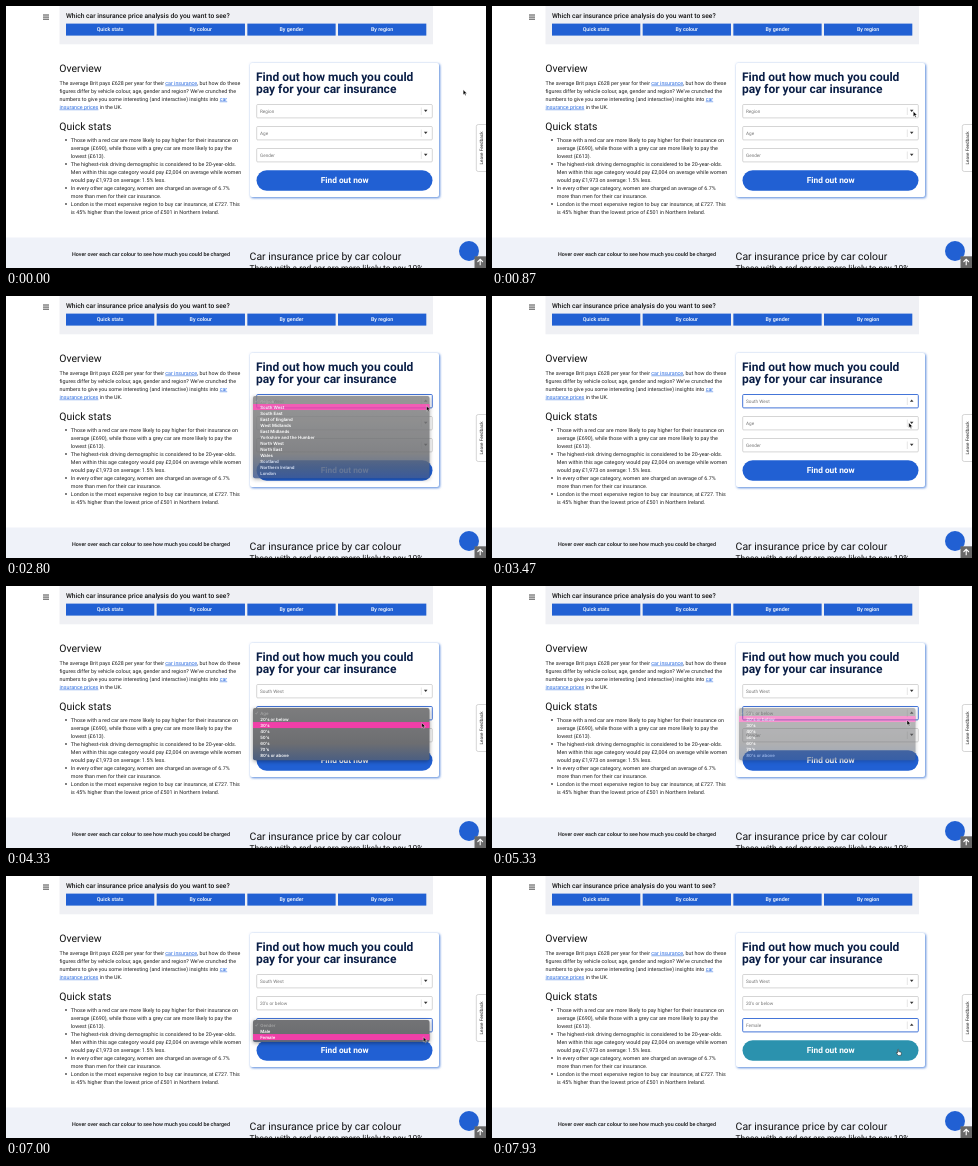
Recreate the animation shown at these times as an HTML page. Size 480 px wide and 262 px high, loop 8 s.

```html
<!DOCTYPE html>
<html lang="en">
<head>
<meta charset="utf-8">
<title>Car insurance price analysis</title>
<style>
  html, body { margin: 0; width: 100%; height: 100%; overflow: hidden; background: #fff; }
  svg { display: block; width: 480px; height: 262px; }
  text { font: 5.333px Roboto, sans-serif; fill: #222; white-space: pre; text-rendering: geometricPrecision; }
  .h2 { font-size: 10.45px; fill: #111; }
  .mid { text-anchor: middle; }
  .med { font-weight: 500; }
  .link { fill: #2a6be0; text-decoration: underline; }
  .nav { fill: #fff; font-weight: 500; text-anchor: middle; }
  .blue { fill: #2160d3; }
  .title { font-size: 12px; font-weight: 700; fill: #0b1f47; }
  .value { font-size: 4.667px; fill: #777; }
  .cta { font-size: 8.33px; font-weight: 700; fill: #fff; text-anchor: middle; }
  .card { filter: drop-shadow(1px 1px 1px #3f78d6c0) drop-shadow(0 0 1.2px #3f78d640); }
  .menu { filter: drop-shadow(0 1px 2px #0006); }
  .menu text { font: 600 4.333px Inter, sans-serif; fill: #fff; }
  .menu .off { fill: #a9a9a9; font-weight: 500; }
</style>
</head>
<body>
<svg viewBox="0 0 480 262" xmlns="http://www.w3.org/2000/svg">
  <defs>
    <linearGradient id="glass" gradientUnits="userSpaceOnUse" x1="0" y1="100" x2="0" y2="182">
      <stop offset="0" stop-color="#858585"/>
      <stop offset=".7" stop-color="#6d6e71"/>
      <stop offset=".88" stop-color="#4f607f"/>
      <stop offset="1" stop-color="#3f5a92"/>
    </linearGradient>
  </defs>

  <rect x="53.5" width="373.5" height="38.3" fill="#eff0f4"/>
  <path d="M37 9h6M37 11.1h6M37 13.2h6" stroke="#333" stroke-width=".9"/>
  <text x="60" y="12" class="med" style="font-size:6.667px;fill:#111">Which car insurance price analysis do you want to see?</text>
  <g id="nav"></g>

  <text x="53.3" y="66.4" class="h2">Overview</text>
  <text x="53.3" y="123.6" class="h2">Quick stats</text>
  <g id="copy"></g>

  <rect y="231.5" width="480" height="31" fill="#eff2f9"/>
  <text x="145" y="250" class="mid med" style="fill:#111">Hover over each car colour to see how much you could be charged</text>
  <text x="243.6" y="253.8" class="h2">Car insurance price by car colour</text>
  <text x="243.6" y="264.8" style="font-size:8.38px;fill:#111">Those with a red car are more likely to pay 10%</text>

  <rect class="card" x="244" y="57" width="189" height="134" rx="2" fill="#fff"/>
  <text x="250" y="75.3" class="title">Find out how much you</text>
  <text x="250" y="87.2" class="title">pay for your car insurance</text>
  <g id="fields"></g>
  <rect id="button" x="250.5" y="164.3" width="176" height="20.4" rx="10.2"/>
  <text x="338.7" y="177.2" class="cta">Find out now</text>

  <rect x="470.3" y="118.5" width="14" height="47" rx="2" fill="#fff" stroke="#bbb" stroke-width=".6"/>
  <text class="mid" transform="translate(477 142) rotate(-90)" style="font-size:4.6px">Leave Feedback</text>
  <circle cx="463" cy="245" r="10" class="blue"/>
  <rect x="468.5" y="250.3" width="11.5" height="11.7" fill="#686868"/>
  <path d="M474.2 259.3v-6M471.5 256l2.7-2.8 2.7 2.8" fill="none" stroke="#fff" stroke-width="1.1"/>

  <g id="menus"></g>
  <g id="cursor">
    <path id="arrow" d="M0 0v5l1.2-1.1.8 1.9.9-.4-.8-1.8h1.6z" fill="#000" stroke="#fff" stroke-width=".4"/>
    <path id="hand" d="M0 .4q.6-.8 1 0v2l2.4.6q.6.3.4 1.2l-.5 2H.6L-1.3 3.8q0-.8.7-.5l.6.5z" fill="#fff" stroke="#000" stroke-width=".45"/>
  </g>
</svg>
<script>
const NS = 'http://www.w3.org/2000/svg';
const $ = id => document.getElementById(id);
function add(parent, tag, attrs = {}, text = '') {
  const el = document.createElementNS(NS, tag);
  for (const k in attrs) el.setAttribute(k, attrs[k]);
  el.textContent = text;
  return parent.appendChild(el);
}

// Second half of the card heading's first line
document.querySelector('.title').textContent += ' could';

['Quick stats', 'By colour', 'By gender', 'By region'].forEach((label, i) => {
  const x = 60 + i * 90.67;
  add($('nav'), 'rect', { x, y: 17.6, width: 88.3, height: 12, class: 'blue' });
  add($('nav'), 'text', { x: x + 44.1, y: 25.3, class: 'nav' }, label);
});

// Underscores mark links, a leading star marks a bullet
function lines(x, y, list) {
  list.forEach((line, i) => {
    const base = y + i * 8;
    if (line[0] === '*') add($('copy'), 'circle', { cx: 60, cy: base - 1.8, r: .9, fill: '#444' });
    const text = add($('copy'), 'text', { x, y: base });
    line.replace('*', '').split('_').forEach((part, j) =>
      add(text, 'tspan', j % 2 ? { class: 'link' } : {}, part));
  });
}
lines(53.5, 78.6, [
  'The average Brit pays £628 per year for their _car insurance_, but how do these',
  'figures differ by vehicle colour, age, gender and region? We’ve crunched the',
  'numbers to give you some interesting (and interactive) insights into _car_',
  '_insurance prices_ in the UK.'
]);
lines(64.8, 135.8, [
  '*Those with a red car are more likely to pay higher for their insurance on',
  'average (£690), while those with a grey car are more likely to pay the',
  'lowest (£613).',
  '*The highest-risk driving demographic is considered to be 20-year-olds.',
  'Men within this age category would pay £2,004 on average while women',
  'would pay £1,973 on average: 1.5% less.',
  '*In every other age category, women are charged an average of 6.7%',
  'more than men for their car insurance.',
  '*London is the most expensive region to buy car insurance, at £727. This',
  'is 45% higher than the lowest price of £501 in Northern Ireland.'
]);

const ROW = 6.02;
const fields = [
  { y: 98.5, open: 1133, close: 2667, blur: 3667, pick: 1,
    items: ['Region', 'South West', 'South East', 'East of England', 'West Midlands', 'East Midlands',
      'Yorkshire and the Humber', 'North West', 'North East', 'Wales', 'Scotland', 'Northern Ireland', 'London'] },
  { y: 120.5, open: 3667, close: 5133, blur: 6067, pick: 1,
    items: ['Age', "20's or below", "30's", "40's", "50's", "60's", "70's", "80's or above"] },
  { y: 142.5, open: 6067, close: 7400, blur: 8000, pick: 2, items: ['Gender', 'Male', 'Female'] }
];

for (const f of fields) {
  const { y, items } = f;
  f.box = add($('fields'), 'rect', { x: 250.7, y, width: 175.6, height: 13.4, rx: 1, fill: '#fff' });
  f.label = add($('fields'), 'text', { x: 254, y: y + 8.5, class: 'value' });
  add($('fields'), 'path', { d: `M415.3 ${y + 3}v7.5`, stroke: '#ccc', 'stroke-width': .5 });
  f.caret = add($('fields'), 'path', { fill: '#333' });

  f.menu = add($('menus'), 'g', { class: 'menu' });
  const top = y + 1.5;
  add(f.menu, 'rect', { x: 247, y: top, width: 176.5, height: items.length * ROW + 4, rx: 2, fill: 'url(#glass)' });
  f.mark = add(f.menu, 'rect', { x: 247, width: 176.5, height: ROW, fill: '#f03fa8' });
  items.forEach((item, i) =>
    add(f.menu, 'text', { x: 254.2, y: top + 6.5 + i * ROW, class: i ? '' : 'off' }, item));
  add(f.menu, 'path', { d: `M249.3 ${top + 5}l1 1.2 1.5-2.6`, fill: 'none', stroke: '#a9a9a9', 'stroke-width': .5 });
}

// Pointer stops: time, x, y
const path = [
  [0, 457.2, 83.8], [270, 433, 97], [530, 433, 97], [870, 421.3, 105.5], [1867, 421.3, 105.5],
  [2200, 420.5, 110], [3000, 420.5, 110], [3467, 416.8, 126.8], [4000, 416.8, 126.8],
  [4333, 415.7, 136.8], [4467, 415.7, 136.8], [4733, 415, 134.2], [5467, 415, 134.2],
  [5933, 418.5, 149], [6400, 418.5, 149], [7000, 417.3, 161], [7600, 417.3, 161], [7933, 405.6, 173.2]
];
const clamp = v => Math.max(0, Math.min(1, v));
function pointer(t) {
  let i = 0;
  while (i < path.length - 2 && t >= path[i + 1][0]) i++;
  const [a, b] = [path[i], path[i + 1]];
  const p = clamp((t - a[0]) / (b[0] - a[0]));
  const e = p * p * (3 - 2 * p);
  return [a[1] + (b[1] - a[1]) * e, a[2] + (b[2] - a[2]) * e];
}

function drawField(f, t, py) {
  const focus = t >= f.open && t < f.blur;
  const since = t - f.close;
  const alpha = t < f.open ? 0 : 1 - clamp((since - 100) / 220);
  f.box.setAttribute('stroke', focus ? '#2f66d4' : '#b9b9b9');
  f.box.setAttribute('stroke-width', focus ? .9 : .6);
  f.label.textContent = f.items[since >= 133 ? f.pick : 0];
  f.caret.setAttribute('d', focus
    ? `M417.9 ${f.y + 7.2}h3.6l-1.8-2.2z`
    : `M417.9 ${f.y + 5.2}h3.6l-1.8 2.2z`);

  f.menu.setAttribute('visibility', alpha > 0 ? 'visible' : 'hidden');
  f.menu.setAttribute('opacity', alpha);
  const row = since >= 0 ? f.pick : Math.floor((py - f.y - 3.5) / ROW);
  const blink = since >= 0 && since < 60;
  f.mark.setAttribute('y', f.y + 3.5 + row * ROW);
  f.mark.setAttribute('visibility', alpha > 0 && row > 0 && !blink ? 'visible' : 'hidden');
}

const from = [33, 96, 211], to = [43, 146, 174];
function draw(ms) {
  const t = Math.floor((ms % 8000 + 4) * .015) / .015 + 1;
  const [x, y] = pointer(t);
  for (const f of fields) drawField(f, t, y);

  const hover = t > 7700;
  const k = clamp((t - 7700) / 220);
  $('button').setAttribute('fill', `rgb(${from.map((c, i) => Math.round(c + (to[i] - c) * k))})`);
  $('cursor').setAttribute('transform', `translate(${x} ${y})`);
  $('arrow').setAttribute('visibility', hover ? 'hidden' : 'visible');
  $('hand').setAttribute('visibility', hover ? 'visible' : 'hidden');
}

const start = performance.now();
function tick() {
  draw(performance.now() - start);
  requestAnimationFrame(tick);
}
tick();
</script>
</body>
</html>
```
